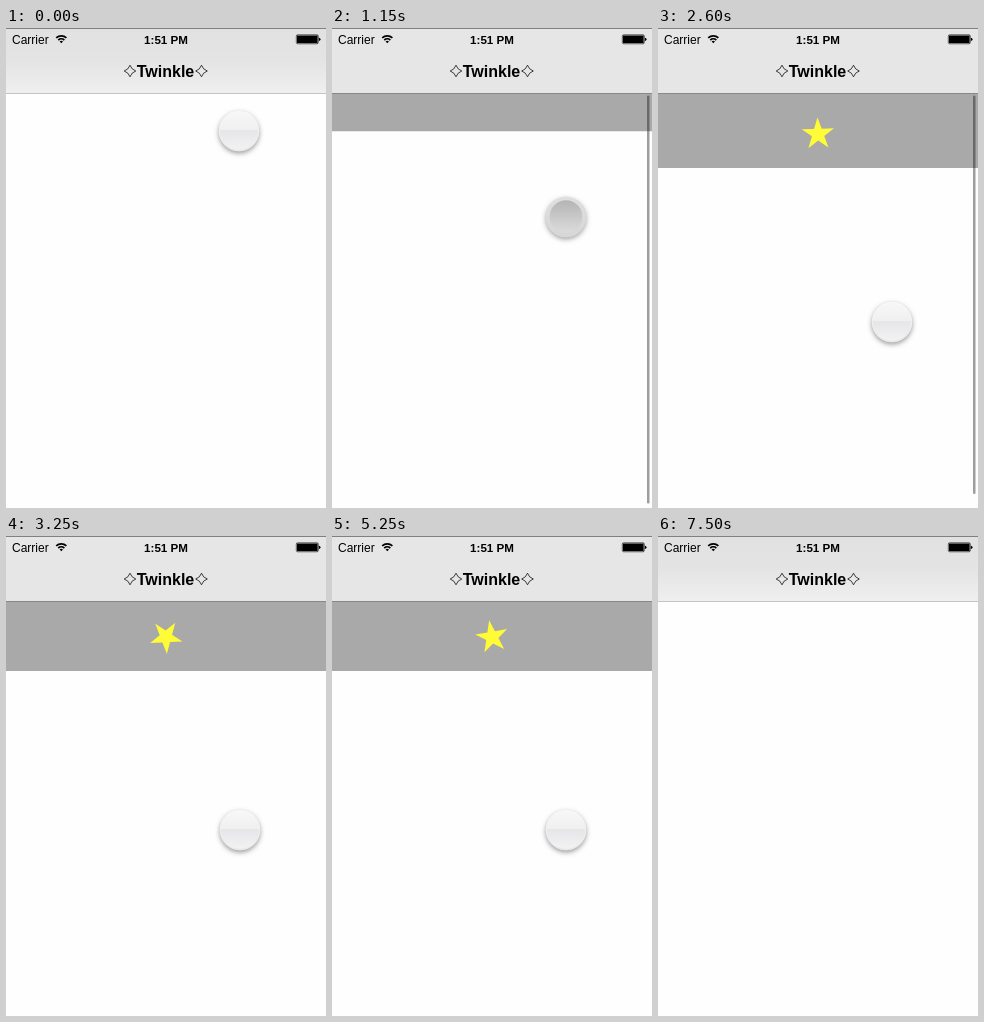
Write an HTML page with a canvas that moves like this. It is 320 px wide and 480 px high and loops after 8.25 s.

```html
<!DOCTYPE html>
<html lang="en">
<head>
<meta charset="utf-8">
<title>Pull to refresh</title>
<style>
html, body { margin: 0; width: 100%; height: 100%; overflow: hidden; background: #fff; }
canvas { display: block; width: 320px; height: 480px; }
</style>
</head>
<body>
<canvas id="stage"></canvas>
<script>
const W = 320, H = 480, LOOP = 8250;
const BAR = 65, INSET = 70;
const PRESS = 250, RELEASE = 2450, SPIN = 2570, CLOSE = 6500, LEAVE = 7500;
const FONT = '"Liberation Sans", Arial, sans-serif';

const canvas = document.getElementById('stage');
const ctx = canvas.getContext('2d');
const dpr = window.devicePixelRatio || 1;
canvas.width = W * dpr;
canvas.height = H * dpr;

const clamp = (v, lo = 0, hi = 1) => Math.min(hi, Math.max(lo, v));
const ramp = (t, from, to) => clamp((t - from) / (to - from));
const mix = (a, b, k) => a + (b - a) * k;
const smooth = k => k * k * (3 - 2 * k);
const gray = v => `rgb(${v},${v},${v})`;

// Finger height over time
const path = [[550, 103], [850, 150], [1150, 189], [1400, 207], [1900, 252], [2400, 294]];

function fingerY(t) {
  for (let i = 1; i < path.length; i++) {
    const [t0, y0] = path[i - 1], [t1, y1] = path[i];
    if (t < t1) return mix(y0, y1, ramp(t, t0, t1));
  }
  return path[path.length - 1][1];
}

// Rubber-band resistance after a 10px slop
function rubber(d) {
  const x = Math.max(0, d - 10);
  return H * (1 - 1 / (x * 0.55 / H + 1));
}

function pullOffset(t) {
  if (t < RELEASE) return rubber(fingerY(t) - path[0][1]);
  if (t < CLOSE) return mix(rubber(191), INSET, smooth(ramp(t, RELEASE, RELEASE + 270)));
  return INSET * (1 - smooth(ramp(t, CLOSE, CLOSE + 450)));
}

function rect(x, y, w, h, fill) {
  ctx.fillStyle = fill;
  ctx.fillRect(x, y, w, h);
}

function disc(x, y, r, fill) {
  ctx.fillStyle = fill;
  ctx.beginPath();
  ctx.arc(x, y, r, 0, 7);
  ctx.fill();
}

function gradient(y0, y1, ...stops) {
  const g = ctx.createLinearGradient(0, y0, 0, y1);
  stops.forEach(([at, color]) => g.addColorStop(at, color));
  return g;
}

function text(str, x, y, font, align) {
  ctx.font = `${font} ${FONT}`;
  ctx.textAlign = align;
  ctx.fillStyle = '#000';
  ctx.fillText(str, x, y);
}

function sparklePath(x, y, r, pinch) {
  ctx.beginPath();
  ctx.moveTo(x, y - r);
  for (let i = 0; i < 4; i++) {
    const a = i * Math.PI / 2, m = a - Math.PI / 4;
    ctx.quadraticCurveTo(x + pinch * Math.cos(m), y + pinch * Math.sin(m),
      x + r * Math.cos(a), y + r * Math.sin(a));
  }
  ctx.closePath();
}

function star(x, y, r, angle) {
  ctx.fillStyle = '#fffb36';
  ctx.beginPath();
  for (let i = 0; i < 10; i++) {
    const a = angle - Math.PI / 2 + i * Math.PI / 5;
    const d = i % 2 ? r * 0.382 : r;
    ctx.lineTo(x + d * Math.cos(a), y + d * Math.sin(a));
  }
  ctx.closePath();
  ctx.fill();
}

function drawHeader(t, offset) {
  if (offset <= 0) return;
  ctx.save();
  ctx.beginPath();
  ctx.rect(0, BAR, W, offset);
  ctx.clip();
  rect(0, BAR, W, offset, '#a9a9a9');
  const y = BAR + offset - 34.5;
  if (t < RELEASE) {
    ctx.globalAlpha = ramp(offset, 41, 50);
    ctx.fillStyle = '#fbc22f';
    for (let i = -1; i <= 1; i++) {
      sparklePath(159.5 + i * 37.5, y, 6, 2.3);
      ctx.fill();
    }
  } else {
    star(160, y + 0.5, 17, -Math.max(0, t - SPIN) / 1000);
  }
  ctx.restore();
}

function drawScroller(t, offset) {
  if (offset <= 0 || t > 3100) return;
  const end = t < RELEASE ? Math.min(478, 514 - offset) : 541 - offset;
  ctx.globalAlpha = ramp(offset, 0, 8) * (1 - ramp(t, 2800, 3050));
  ctx.fillStyle = 'rgba(0,0,0,0.38)';
  ctx.beginPath();
  ctx.roundRect(315, 67.5, 2.5, end - 67.5, 1.2);
  ctx.fill();
  ctx.globalAlpha = 1;
}

function drawWifi(x, y) {
  ctx.strokeStyle = '#000';
  ctx.lineWidth = 1.7;
  const mid = -Math.PI / 2, half = 0.76;
  for (const r of [4.4, 7.4]) {
    ctx.beginPath();
    ctx.arc(x, y, r, mid - half, mid + half);
    ctx.stroke();
  }
  ctx.fillStyle = '#000';
  ctx.beginPath();
  ctx.moveTo(x, y);
  ctx.arc(x, y, 2.4, mid - half, mid + half);
  ctx.fill();
}

function drawBattery() {
  ctx.strokeStyle = '#000';
  ctx.lineWidth = 0.6;
  ctx.beginPath();
  ctx.roundRect(290.3, 6.8, 22, 9, 1.3);
  ctx.stroke();
  rect(291, 7.5, 20.6, 7.6, '#000');
  ctx.beginPath();
  ctx.arc(312.9, 11.3, 1.6, -Math.PI / 2, Math.PI / 2);
  ctx.fill();
}

function drawBar(offset) {
  const k = ramp(offset, 0, 20);
  rect(0, 0, W, BAR, gradient(0, BAR,
    [0, gray(mix(225, 230, k))], [0.5, gray(mix(228, 230, k))], [1, gray(mix(239, 230, k))]));
  rect(0, 0, W, 1, '#808080');
  rect(0, BAR, W, 1, gray(mix(196, 136, k)));

  text('Carrier', 6, 16, '12px', 'left');
  text('1:51 PM', 160, 15.7, 'bold 11.6px', 'center');
  drawWifi(55.3, 15.2);
  drawBattery();

  text('Twinkle', 159.5, 49, 'bold 16px', 'center');
  ctx.strokeStyle = '#111';
  ctx.lineWidth = 0.8;
  for (const x of [124, 195.5]) {
    sparklePath(x, 43, 5.8, 2);
    ctx.stroke();
  }
}

function drawButton(t) {
  if (t >= LEAVE) return;
  const x = mix(233, 234, ramp(t, 550, 700)), y = fingerY(t);
  const pressed = t >= PRESS && t < RELEASE;
  ctx.save();
  ctx.shadowColor = pressed ? 'rgba(0,0,0,0.36)' : 'rgba(0,0,0,0.4)';
  ctx.shadowBlur = 5 * dpr;
  ctx.shadowOffsetY = 2 * dpr;
  disc(x, y, 20.2, pressed ? '#dadada' : '#ececec');
  ctx.restore();
  if (pressed) {
    disc(x, y, 20.2, gradient(y - 20, y + 20, [0, '#dfdfdf'], [1, '#d6d6d6']));
    disc(x, y - 0.5, 16.3, gradient(y - 17, y + 16, [0, '#b4b4b4'], [0.5, '#c8c8c8'], [1, '#dcdcdc']));
  } else {
    disc(x, y, 20.2, gradient(y - 20, y + 20, [0, '#f8f8f8'], [1, '#e6e6e6']));
    disc(x, y, 19, gradient(y - 19, y + 19,
      [0, '#f7f7f7'], [0.46, '#f0f0f1'], [0.49, '#e6e6e8'], [0.7, '#ebebed'], [1, '#f2f2f2']));
  }
}

function draw(t) {
  const offset = pullOffset(t);
  ctx.setTransform(dpr, 0, 0, dpr, 0, 0);
  rect(0, 0, W, H, '#fefefe');
  drawHeader(t, offset);
  drawBar(offset);
  drawScroller(t, offset);
  drawButton(t);
}

const start = performance.now();
function tick() {
  draw((performance.now() - start) % LOOP);
  requestAnimationFrame(tick);
}
tick();
</script>
</body>
</html>
```
